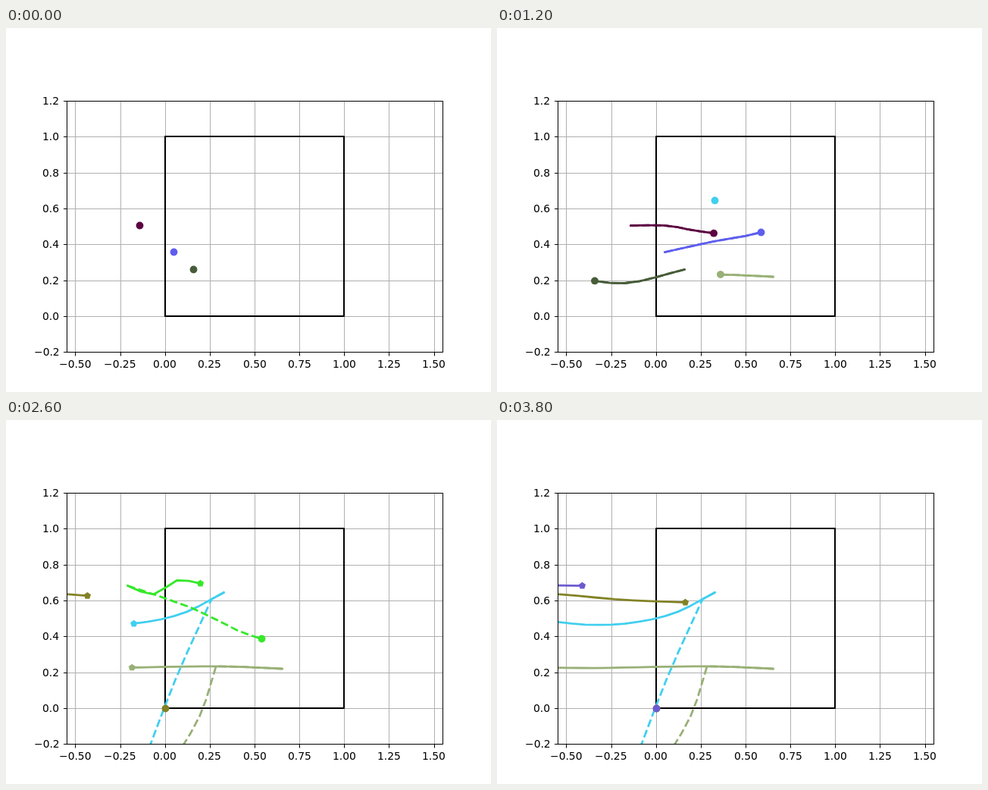
An HTML page with a canvas that plays this animation: 640x480 px, repeating every 4 s.

```html
<!DOCTYPE html>
<html>
<head>
<meta charset="utf-8">
<style>
html, body { margin: 0; width: 100%; height: 100%; overflow: hidden; background: #fff; }
canvas { display: block; }
</style>
</head>
<body>
<canvas id="stage" width="640" height="480"></canvas>
<script>
const ctx = document.getElementById('stage').getContext('2d');
const STEP = 200, STEPS = 20;
const FORK = 7; // last step at which estimate and true path agree
const LEFT = 80.5, RIGHT = 576.5, TOP = 96.5, BOTTOM = 427.5;
const ORIGIN = [210, 380];
const px = x => 210.2 + x * 236.6;
const py = y => 380.4 - y * 236.5;

// Catmull-Rom curve through evenly timed keys, sampled once per step
function spline(keys, steps) {
  const n = keys.length - 1;
  const key = (i, k) =>
    i < 0 ? 2 * keys[0][k] - keys[1][k] :
    i > n ? 2 * keys[n][k] - keys[n - 1][k] : keys[i][k];
  return Array.from({ length: steps + 1 }, (_, s) => {
    const t = s / steps * n, i = Math.min(n - 1, Math.floor(t)), u = t - i;
    return [0, 1].map(k => {
      const [a, b, c, d] = [-1, 0, 1, 2].map(j => key(i + j, k));
      return b + u / 2 * (c - a + u * (2 * a - 5 * b + 4 * c - d + u * (3 * (b - c) + d - a)));
    });
  });
}

const tracks = [];
function track(color, start, last, keys, estimate) {
  const path = spline(keys, last - start);
  const shared = path.slice(0, Math.max(0, FORK + 1 - start));
  const guess = estimate
    ? shared.concat(spline([shared.at(-1), ...estimate], last - FORK).slice(1))
    : [ORIGIN];
  tracks.push({ color, start, last, path, guess });
}

track('#5c0342', 0, 11,
  [[176, 260], [223, 260], [257, 266], [297, 271.5], [342, 274.5], [387, 271]],
  [[330, 264.5], [346, 250]]);
track('#5e5eee', 0, 9,
  [[221, 295], [285, 281], [348, 269], [414, 245]],
  [[391, 261], [412, 272]]);
track('#475c39', 0, 12,
  [[247, 318], [168, 336], [89, 327.5], [10, 326]],
  [[10, 332]]);
track('#98b076', 2, 19,
  [[364, 327.5], [290, 324.5], [213, 325], [133, 326.5], [57, 326]],
  [[255, 390], [216, 455], [170, 520], [125, 585]]);
track('#40cfef', 6, 19,
  [[287, 227], [234, 254], [177, 267], [120, 269.5], [62, 264]],
  [[223, 342], [175, 468], [130, 590], [85, 710]]);
track('#36e829', 7, 13,
  [[160, 218], [194, 229.5], [225, 211], [256, 215]],
  [[244, 247], [305, 277], [337, 288]]);
track('#828226', 8, 19, [[-20, 229], [74, 229], [163, 236.5], [248, 240]]);
track('#6c5bd0', 15, 19, [[-28, 216], [112, 218]]);

function line(points, color, width, dash = []) {
  ctx.strokeStyle = color;
  ctx.lineWidth = width;
  ctx.lineJoin = 'round';
  ctx.lineCap = dash.length ? 'butt' : 'square';
  ctx.setLineDash(dash);
  ctx.beginPath();
  points.forEach(p => ctx.lineTo(...p));
  ctx.stroke();
  ctx.setLineDash([]);
}

function circle([x, y]) {
  ctx.beginPath();
  ctx.arc(x, y, 4.9, 0, 7);
  ctx.fill();
}

function pentagon([x, y]) {
  ctx.beginPath();
  for (let i = 0; i < 5; i++) {
    const a = i * Math.PI * 0.4 - Math.PI / 2;
    ctx.lineTo(x + 4.8 * Math.cos(a), y + 4.8 * Math.sin(a));
  }
  ctx.closePath();
  ctx.fill();
}

// align: share of the text width that lies left of x
function label(value, digits, x, y, align) {
  const text = value.toFixed(digits).replace('-', '\u2212');
  ctx.fillText(text, Math.floor(x - ctx.measureText(text).width * align), y);
}

function drawGrid() {
  ctx.fillStyle = '#fff';
  ctx.fillRect(0, 0, 640, 480);
  ctx.fillStyle = '#000';
  ctx.font = '13.89px "DejaVu Sans", sans-serif';
  for (let i = -2; i <= 6; i++) {
    const x = Math.floor(px(i / 4)) + 0.5;
    line([[x, TOP], [x, BOTTOM]], '#b0b0b0', 1);
    line([[x, BOTTOM], [x, BOTTOM + 4.5]], '#000', 1);
    label(i / 4, 2, px(i / 4), 448, 0.5);
  }
  for (let i = -1; i <= 6; i++) {
    const y = Math.floor(py(i / 5)) + 0.5;
    line([[LEFT, y], [RIGHT, y]], '#b0b0b0', 1);
    line([[LEFT - 4.5, y], [LEFT, y]], '#000', 1);
    label(i / 5, 1, 70.8, y + 4.5, 1);
  }
  line([[210, 380], [446, 380], [446, 143], [210, 143], [210, 380]], '#000', 2);
}

function drawTrack({ color, start, last, path, guess }, step) {
  if (step < start || step > last) return;
  const seen = path.slice(0, step - start + 1);
  const guessed = guess.slice(0, step - start + 1);
  if (seen.length > 1) line(seen, color, 2.78);
  if (guessed.length > 1) line(guessed, color, 2.78, [10.28, 4.44]);
  ctx.fillStyle = color;
  pentagon(seen.at(-1));
  circle(guessed.at(-1));
}

function draw(step) {
  drawGrid();
  ctx.save();
  ctx.beginPath();
  ctx.rect(80, 96, 497, 332);
  ctx.clip();
  ctx.translate(0.5, 0.5);
  tracks.forEach(t => drawTrack(t, step));
  ctx.restore();
  ctx.strokeStyle = '#000';
  ctx.lineWidth = 1;
  ctx.lineJoin = 'miter';
  ctx.strokeRect(LEFT, TOP, RIGHT - LEFT, BOTTOM - TOP);
}

function tick() {
  draw(Math.floor(performance.now() / STEP) % STEPS);
  requestAnimationFrame(tick);
}
tick();
</script>
</body>
</html>
```
